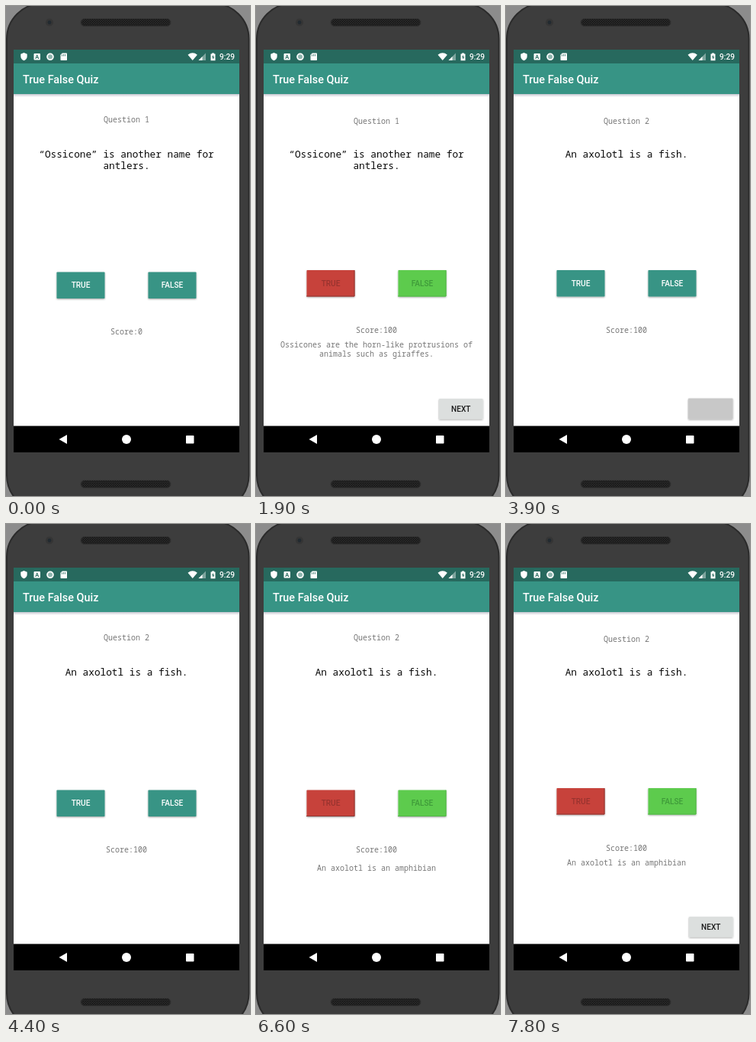
An HTML page for the animation above (8000 ms loop, 320 px wide and 640 px high).

```html
<!DOCTYPE html>
<html lang="en">
<head>
<meta charset="utf-8">
<title>True False Quiz</title>
<style>
  html, body { margin: 0; width: 100%; height: 100%; overflow: hidden; background: #8c8c8c; }
  svg { display: block; width: 320px; height: 640px; }
  .ui { font-family: Roboto, sans-serif; font-weight: 500; }
  .mono { font-family: "Noto Sans Mono", "DejaVu Sans Mono", monospace; text-anchor: middle; }
  .small { font-size: 10px; fill: #777; }
  .ask { font-size: 12.75px; fill: #080808; }
  .label { font-size: 10.1px; text-anchor: middle; }
</style>
</head>
<body>
<svg viewBox="0 0 320 640">
  <defs>
    <pattern id="mesh" width="3" height="3" patternUnits="userSpaceOnUse">
      <rect width="3" height="3" fill="#2b2b2b"/>
      <circle cx=".8" cy=".8" r=".8" fill="#111"/>
      <circle cx="2.3" cy="2.3" r=".8" fill="#111"/>
    </pattern>
    <linearGradient id="barShade" x2="0" y2="1">
      <stop offset="0" stop-color="#c6c6d0"/>
      <stop offset="1" stop-color="#fff"/>
    </linearGradient>
    <filter id="lift" x="-10%" y="-15%" width="120%" height="140%">
      <feDropShadow dx="0" dy="1" stdDeviation=".9" flood-color="#000" flood-opacity=".38"/>
    </filter>
  </defs>

  <!-- phone -->
  <rect width="320" height="640" fill="#8c8c8c"/>
  <rect x="1" y="-3" width="317.5" height="662" rx="46" fill="#3d3d3d" stroke="#2b2b2b" stroke-width="2"/>
  <circle cx="57" cy="21.5" r="5" fill="#353535"/>
  <circle cx="57" cy="21.5" r="2.4" fill="#222a30"/>
  <rect x="98" y="16.5" width="118" height="10" rx="5" fill="url(#mesh)" stroke="#333"/>
  <rect x="98" y="619.5" width="118" height="10" rx="5" fill="url(#mesh)" stroke="#333"/>

  <!-- screen -->
  <rect x="10" y="57" width="296" height="526" fill="#fff"/>
  <rect x="10" y="115" width="296" height="4" fill="url(#barShade)"/>
  <rect x="10" y="75" width="296" height="40" fill="#379485"/>
  <rect x="10" y="57" width="296" height="18" fill="#27695e"/>
  <g fill="#fff">
    <path d="M23.5 61l4.2 1.7v3c0 2.700-1.800 4.700-4.200 5.600c-2.400-.9-4.200-2.900-4.200-5.600v-3z"/>
    <rect x="36.500" y="62" width="8.500" height="8.500" rx="1"/>
    <path d="M38.700 69l2-5.200l2 5.200M39.500 67.300h2.500" fill="none" stroke="#27695e"/>
    <circle cx="58" cy="66.300" r="3.900" fill="#8fb5ae" stroke="#fff" stroke-width="1.800"/>
    <path d="M73.800 61.500h5.500q.7 0 .7.700v8.100q0 .7-.7.700h-7.100q-.7 0-.7-.7v-6.500z"/>
    <path d="M73.500 63.500v2M75.500 63v2.500M77.500 63v2.500" stroke="#27695e" stroke-width=".8"/>
    <path d="M238.500 63.700q6.200-4.700 12.400 0l-6.200 7.300z"/>
    <path d="M262 61.500v9.500h-9.500z" opacity=".4"/>
    <path d="M257.500 66v5h-5z"/>
    <path d="M270 61.500h3v1h1.500v8.700h-6v-8.700h1.500z"/>
    <path d="M272 63.800l-2 3.400h1.300v2.800l2-3.500h-1.300z" fill="#27695e"/>
    <text class="ui" x="280" y="70" font-size="10.1">9:29</text>
    <text class="ui" x="22" y="100.800" font-size="14.400">True False Quiz</text>
  </g>
  <rect x="10" y="548.500" width="296" height="34.500" fill="#000"/>
  <g fill="#fff">
    <path d="M69.500 566l10.500-6v12z"/>
    <circle cx="158" cy="566" r="6"/>
    <rect x="236" y="561" width="10.500" height="10.500" rx=".8"/>
  </g>

  <!-- quiz -->
  <text id="number" class="mono small" x="158"/>
  <g id="ask"></g>
  <g id="choices"></g>
  <text id="score" class="mono small" x="158"/>
  <g id="note"></g>
  <g id="next"></g>
</svg>
<script>
const LOOP = 8000;
const quiz = [
  { ask: ["“Ossicone” is another name for", "antlers."],
    note: ["Ossicones are the horn-like protrusions of", "animals such as giraffes."] },
  { ask: ["An axolotl is a fish."], note: ["An axolotl is an amphibian"] }
];
const steps = [
  { at: 0, q: 0, score: 0 },
  { at: 1100, q: 0, score: 100, answered: true },
  { at: 1900, q: 0, score: 100, answered: true, next: "NEXT" },
  { at: 3800, q: 1, score: 100, next: " " },
  { at: 4000, q: 1, score: 100 },
  { at: 6100, q: 1, score: 100, answered: true },
  { at: 6800, q: 1, score: 100, answered: true, next: "NEXT" }
];

const $ = id => document.getElementById(id);

const lines = (list, x, y, gap, cls) => list.map((s, i) =>
  `<text class="mono ${cls}" x="${x}" y="${y + i * gap}">${s}</text>`).join("");

const button = (x, y, w, h, fill, text, ink, edge = "") =>
  `<g filter="url(#lift)"><rect x="${x}" y="${y}" width="${w}" height="${h}" rx=".8" fill="${fill}"/></g>` +
  (edge && `<path d="M${x + w - .5} ${y}v${h - .5}h${-w}" fill="none" stroke="${edge}"/>`) +
  `<text class="ui label" x="${x + w / 2}" y="${y + h / 2 + 3.7}" fill="${ink}">${text}</text>`;

function choice(x, y, text, done, right) {
  if (!done) return button(x, y, 63, 34.5, "#379485", text, "#fff");
  return right
    ? button(x, y, 63, 34.5, "#5dcb4e", text, "#3f9b3a", "#52b646")
    : button(x, y, 63, 34.5, "#c7423b", text, "#98332f", "#8d3834");
}

function render(s) {
  const { ask, note } = quiz[s.q];
  const shift = s.next ? 2.5 : 0;
  const top = 347.5 - shift;
  $("number").textContent = "Question " + (s.q + 1);
  $("number").setAttribute("y", 151.7 + shift);
  $("ask").innerHTML = lines(ask, 158, 198.2, 15, "ask");
  $("choices").innerHTML =
    choice(66.5, top, "TRUE", s.answered, false) +
    choice(186.5, top, "FALSE", s.answered, true);
  $("score").textContent = "Score:" + s.score;
  $("score").setAttribute("y", 429 - shift);
  $("note").innerHTML = s.answered ? lines(note, 158, s.next ? 446 : 453, 12, "small") : "";
  $("next").innerHTML = !s.next ? "" : s.next === "NEXT"
    ? button(240, 513, 57.5, 26.5, "#dcdfde", s.next, "#1c1c1c")
    : button(239, 512.5, 58.5, 27, "#c8c8c8", s.next, "#1c1c1c");
}

let shown;
function tick(now) {
  const t = now % LOOP;
  const step = steps.filter(s => s.at <= t).pop();
  if (step !== shown) render(shown = step);
}

const start = performance.now();
function frame() {
  tick(performance.now() - start);
  requestAnimationFrame(frame);
}
frame();
</script>
</body>
</html>
```
